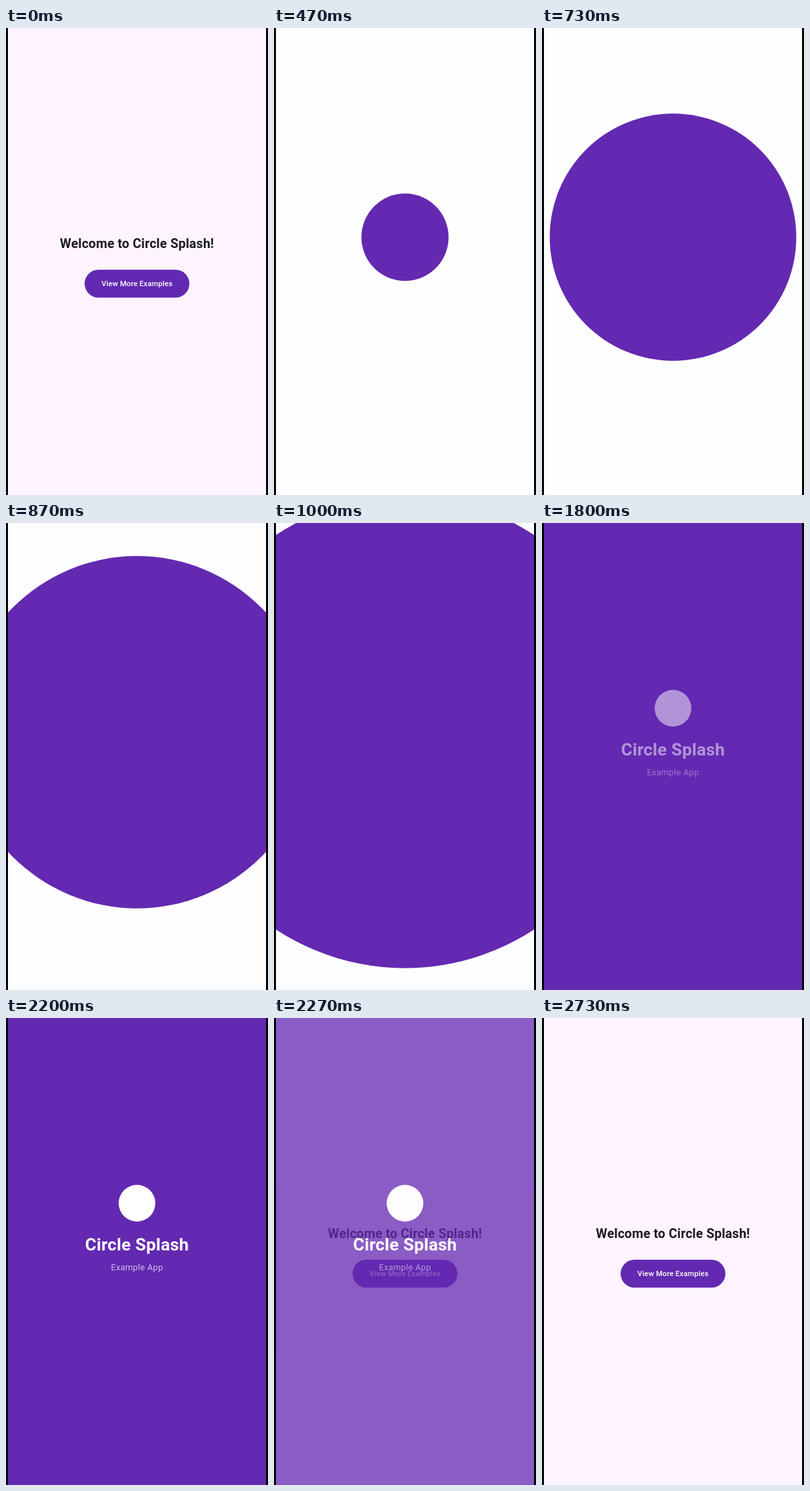
An HTML page that plays this animation: 400 px wide and 711 px high, repeating every 3.6 s.

```html
<!DOCTYPE html>
<html lang="en">
<head>
<meta charset="utf-8">
<title>Circle Splash</title>
<style>
  html, body { margin: 0; width: 100%; height: 100%; overflow: hidden; background: #000; }
  svg { display: block; width: 100%; height: 100%; }
  text { font-family: Roboto, sans-serif; text-anchor: middle; fill: #fff; }
  .purple { fill: #6329b1; }
  .welcome { font-size: 19.7px; font-weight: 700; letter-spacing: .18px; fill: #1d1b20; }
  .label { font-size: 11.4px; font-weight: 500; letter-spacing: .1px; }
  .name { font-size: 26.25px; font-weight: 700; letter-spacing: .27px; }
  .tagline { font-size: 13.125px; letter-spacing: .27px; fill-opacity: .7; }
</style>
</head>
<body>
<svg viewBox="0 0 400 711">
  <rect width="400" height="711" fill="#fefdff"/>
  <circle id="splash" class="purple" cx="200" cy="318.5" r="0"/>
  <g id="brand" opacity="0">
    <circle cx="200" cy="282" r="28" fill="#fff"/>
    <text class="name" x="200" y="354">Circle Splash</text>
    <text class="tagline" x="200" y="384">Example App</text>
  </g>
  <g id="home">
    <rect width="400" height="711" fill="#fdf4ff"/>
    <text class="welcome" x="200" y="335">Welcome to Circle Splash!</text>
    <rect class="purple" x="120" y="368" width="160" height="42.5" rx="21.25"/>
    <text class="label" x="200" y="393.3">View More Examples</text>
  </g>
  <path d="M0 0h3v711h-3zM397 0h3v711h-3z"/>
</svg>
<script>
  const LOOP = 3600, STEP = 200 / 3;
  const [splash, brand, home] = ['splash', 'brand', 'home'].map(id => document.getElementById(id));
  const progress = (value, from, to) => Math.min(1, Math.max(0, (value - from) / (to - from)));

  // The circle accelerates, with the acceleration slowly easing off.
  function splashRadius(step) {
    const u = Math.min(16, Math.max(0, step - 1.5));
    return u * u * (2.357 - 0.0286 * u);
  }

  function draw(time) {
    // The picture advances 15 times a second; 5 ms absorbs rounded step times.
    const step = Math.floor((time % LOOP + 5) / STEP);
    splash.setAttribute('r', splashRadius(step));
    brand.setAttribute('opacity', progress(step, 21, 33));
    home.setAttribute('opacity', step < 1 ? 1 : progress(step, 33, 37));
  }

  let start;
  function tick(now) {
    start ??= now;
    draw(now - start);
    requestAnimationFrame(tick);
  }
  requestAnimationFrame(tick);
</script>
</body>
</html>
```
